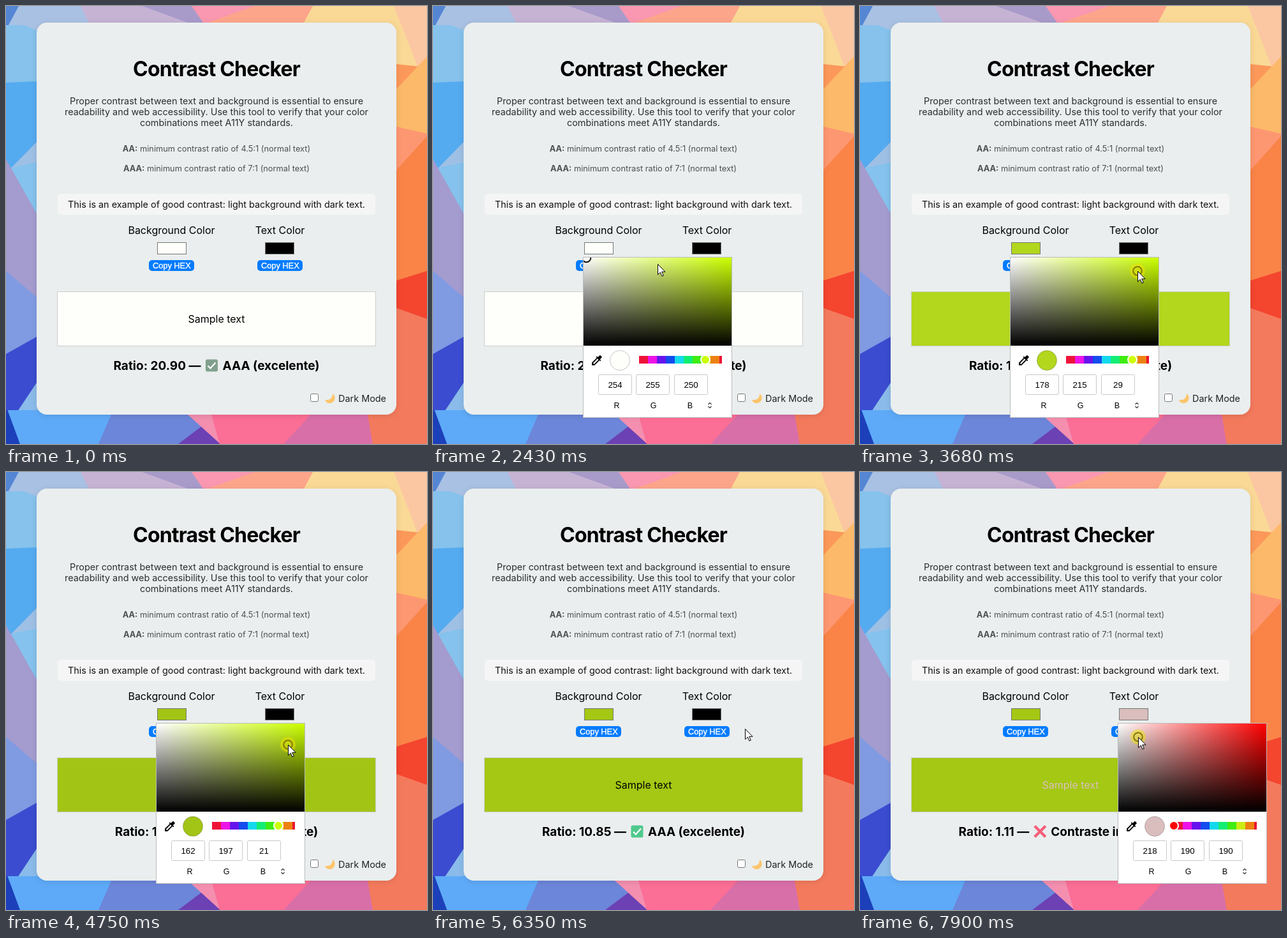
Animation, 660 px wide and 686 px high, one loop 8000 ms. Source, as an HTML page:

```html
<!DOCTYPE html>
<html lang="en">
<head>
<meta charset="utf-8">
<title>Contrast Checker</title>
<style>
html, body { margin: 0; width: 100%; height: 100%; overflow: hidden; }
svg { display: block; width: 660px; height: 686px; font-family: Inter, sans-serif; font-size: 16px; }
.card { fill: #eaeeee; filter: drop-shadow(0 2px 5px rgba(0, 0, 0, .1)); }
.title { font-size: 32px; font-weight: 700; letter-spacing: -.025em; }
.mid { text-anchor: middle; }
.body { font-size: 14.4px; }
.note { font-size: 12.8px; fill: #4c4f50; }
.ui { font-family: "Liberation Sans", Arial, sans-serif; text-anchor: middle; }
.copy { font-size: 12.8px; fill: #fff; stroke: #fff; stroke-width: .4; }
.ratio { font-size: 19px; font-weight: 700; }
</style>
</head>
<body>
<svg viewBox="0 0 660 686">
  <defs>
    <linearGradient id="white"><stop stop-color="#fff"/><stop offset="1" stop-color="#fff" stop-opacity="0"/></linearGradient>
    <linearGradient id="black" x2="0" y2="1"><stop stop-opacity="0"/><stop offset="1"/></linearGradient>
    <clipPath id="area"><rect x="236" y="394" width="232" height="138"/></clipPath>
  </defs>
  <g id="facets"></g>
  <rect class="card" x="48" y="26" width="564" height="614" rx="16"/>

  <text class="mid title" x="330" y="110">Contrast Checker</text>
  <g class="mid body" fill="#2c2e2f">
    <text x="330" y="154">Proper contrast between text and background is essential to ensure</text>
    <text x="330" y="171">readability and web accessibility. Use this tool to verify that your color</text>
    <text x="330" y="188">combinations meet A11Y standards.</text>
  </g>
  <g class="mid note">
    <text x="330" y="228"><tspan font-weight="700">AA:</tspan> minimum contrast ratio of 4.5:1 (normal text)</text>
    <text x="330" y="259"><tspan font-weight="700">AAA:</tspan> minimum contrast ratio of 7:1 (normal text)</text>
  </g>
  <rect x="81" y="294" width="498" height="33" rx="5" fill="#f5f5f5"/>
  <text class="mid body" x="330" y="316" fill="#111">This is an example of good contrast: light background with dark text.</text>

  <text class="mid" x="259.5" y="357">Background Color</text>
  <text class="mid" x="429.5" y="357">Text Color</text>
  <rect id="bgSwatch" x="237.5" y="370.5" width="45" height="18" stroke="#767676"/>
  <rect id="fgSwatch" x="406.5" y="370.5" width="45" height="18" stroke="#767676"/>
  <rect x="224" y="398" width="71" height="17" rx="5" fill="#007bff"/>
  <rect x="394" y="398" width="71" height="17" rx="5" fill="#007bff"/>
  <text class="ui copy" x="259.8" y="411">Copy HEX</text>
  <text class="ui copy" x="429.8" y="411">Copy HEX</text>

  <rect id="sample" x="80.5" y="447.5" width="499" height="85" stroke="#ccc"/>
  <text id="sampleText" class="mid" x="330" y="496">Sample text</text>

  <text id="ratio" class="ratio" y="570"></text>
  <text id="verdict" class="ratio" y="570"></text>
  <g id="check">
    <rect x="-9.5" y="-9.5" width="19" height="19" rx="2.5"/>
    <path d="M-6 .5L-2 4.5L6 -4.5" fill="none" stroke="#fff" stroke-width="2.2"/>
  </g>
  <path id="cross" d="M-8.5 -8.5L8.5 8.5M8.5 -8.5L-8.5 8.5" stroke="#f55f79" stroke-width="4.4"/>

  <rect x="477.5" y="607.5" width="12" height="12" rx="2" fill="#fff" stroke="#767676"/>
  <path d="M512 607C517.5 611 516.5 619 510.5 621.5C505.5 623.5 501 620.5 500 616.5C506 618.5 512.5 615 512 607Z" fill="#fcc56c"/>
  <text class="body" x="596" y="620" text-anchor="end" fill="#222">Dark Mode</text>

  <g id="picker">
    <rect x="235.5" y="393.5" width="233" height="251" fill="#fff" stroke="#bcbcbc"/>
    <g clip-path="url(#area)">
      <rect id="hueFill" x="236" y="394" width="232" height="138"/>
      <rect x="236" y="394" width="232" height="138" fill="url(#white)"/>
      <rect x="236" y="394" width="232" height="138" fill="url(#black)"/>
      <circle id="marker" r="6.8" fill="none" stroke-width="2"/>
    </g>
    <path transform="translate(246.5 544.5) scale(.87)" d="M20.7 5.6l-2.3-2.3a1 1 0 0 0-1.4 0l-3.2 3.1-1.9-1.9-1.4 1.4 1.4 1.4L3 16.2V21h4.8l8.9-8.9 1.4 1.4 1.4-1.4-1.9-1.9 3.1-3.1c.4-.4.4-1 0-1.5zM6.9 19L5 17.1l8-8.1 2 1.9z"/>
    <circle id="chip" cx="293" cy="555" r="15.5" stroke="#000" stroke-opacity=".22"/>
    <g id="strip"></g>
    <circle id="hueDot" cy="554" r="7" stroke="#fff" stroke-width="2"/>
    <g id="fields" class="ui" font-size="13.33"></g>
    <path d="M431.5 624L434 621.5L436.5 624M431.5 627L434 629.5L436.5 627" fill="none" stroke="#333" stroke-width="1.2"/>
  </g>

  <circle id="glow" r="12" fill="#f0e100" fill-opacity=".5"/>
  <path id="cursor" d="M.5 .5V16.8L4.3 13.2L6.9 19.2L9.3 18.1L6.7 12.3H12Z" fill="#fff" stroke="#000"/>
</svg>
<script>
const LOOP = 8000, STEP = 70;
const el = {};
document.querySelectorAll("[id]").forEach(n => el[n.id] = n);

function set(node, attrs) {
  for (const k in attrs) node.setAttribute(k, attrs[k]);
}
function show(node, on) {
  node.style.display = on ? "" : "none";
}
function hsv(h, s, v) {
  return [5, 3, 1].map(n => {
    const k = (n + h / 60) % 6;
    return Math.round(255 * v * (1 - s * Math.max(0, Math.min(k, 4 - k, 1))));
  });
}
const css = c => `rgb(${c.join()})`;

// Each border strip is sliced by slanted cuts: colour, place on the outer edge, place on the card's edge.
// A facet fills everything after its cut; the next one paints over it.
function slice(place, cuts) {
  const deep = 1.15, end = 700;
  el.facets.innerHTML += cuts.map(([color, a, b]) => {
    const pts = [place(a, 0), place(a + (b - a) * deep, deep), place(end, deep), place(end, 0)];
    return `<polygon points="${pts.join(" ")}" fill="${color}"/>`;
  }).join("");
}
slice((p, d) => [48 * d, p], [
  ["#a9c1e3", 0, 0], ["#86c2ec", 19, 38], ["#55abf0", 120, 118], ["#9fc0e5", 262, 213], ["#85c2ed", 255, 245],
  ["#a49bcf", 240, 325], ["#809be2", 415, 456], ["#3b4cd0", 545, 518], ["#8bbbea", 662, 590]
]);
slice((p, d) => [660 - 48 * d, p], [
  ["#fbc7a2", 0, 0], ["#fad996", 133, 10], ["#fb985a", 96, 91], ["#fcb969", 79, 130], ["#fd9771", 200, 189],
  ["#fa8448", 204, 257], ["#f4452f", 415, 430], ["#f47a5d", 490, 473]
]);
slice((p, d) => [p, 26 * d], [
  ["#5486d4", 0, 0], ["#a9c1e3", 20, 6], ["#c6b3d4", 117, 130], ["#a89bca", 213, 285],
  ["#f998b0", 291, 309], ["#fda58b", 390, 316], ["#fad996", 481, 467], ["#fbc7a2", 608, 618]
]);
slice((p, d) => [p, 686 - 46 * d], [
  ["#1c40ba", 0, 0], ["#5eaaf8", 22, 5], ["#6c86d9", 145, 165], ["#6b41b4", 270, 331],
  ["#f48fb0", 336, 285], ["#fb6e95", 335, 322], ["#d96fa8", 435, 478], ["#f47a5d", 575, 567]
]);

// Hue slider in flat bands, from red backwards round the wheel
for (let x = 0, w = 14; x < 130; x += w) {
  const hue = x ? 360 * (1 - (x + w / 2) / 130) : 350;
  el.strip.innerHTML += `<rect x="${323 + x}" y="548" width="${Math.min(w, 130 - x)}" height="12"
    fill="${css(hsv((hue + 360) % 360, 0.92, 0.93))}"/>`;
}

el.fields.innerHTML = ["R", "G", "B"].map((name, i) => {
  const x = 259.5 + Math.round(59.4 * i);
  return `<rect x="${x}" y="577.5" width="52" height="31" rx="2" fill="#fff" stroke="#c8c8c8"/>
    <text class="num" x="${x + 26}" y="598"></text>
    <text x="${288 + 57.5 * i}" y="630" font-size="12.5">${name}</text>`;
}).join("");
const nums = document.querySelectorAll(".num");

// Pointer glides: start, end, goal x, goal y
const glides = [
  [530, 1216, 257, 377], [1880, 2400, 352, 404], [2620, 3600, 435, 415], [3800, 4020, 442, 427],
  [5220, 5480, 443, 425], [5620, 5890, 480, 404], [6210, 6330, 489, 402], [6600, 7060, 417, 376],
  [7160, 7690, 436, 415]
];
function pointer(t) {
  let x = 588, y = 556;
  for (const [from, to, gx, gy] of glides) {
    const rest = 1 - Math.min(1, Math.max(0, (t - from) / (to - from)));
    x = gx + (x - gx) * rest ** 2;
    y = gy + (y - gy) * rest ** 4;
  }
  return [Math.round(x), Math.round(y)];
}

function luminance(c) {
  const lin = c.map(x => (x /= 255) <= 0.03928 ? x / 12.92 : ((x + 0.055) / 1.055) ** 2.4);
  return 0.2126 * lin[0] + 0.7152 * lin[1] + 0.0722 * lin[2];
}
function contrast(a, b) {
  const [hi, lo] = [luminance(a), luminance(b)].sort((x, y) => y - x);
  return (hi + 0.05) / (lo + 0.05);
}
function grade(r) {
  return r >= 7 ? "AAA (excelente)" : r >= 4.5 ? "AA (bueno)" : "Contraste insuficiente";
}

function drawRatio(value, muted) {
  const gap = 34, ok = value >= 4.5;
  el.ratio.textContent = `Ratio: ${value.toFixed(2)} —`;
  el.verdict.textContent = grade(value);
  const a = el.ratio.getComputedTextLength();
  const x = 330 - (a + gap + el.verdict.getComputedTextLength()) / 2;
  el.ratio.setAttribute("x", x);
  el.verdict.setAttribute("x", x + a + gap);
  const at = `translate(${x + a + gap / 2} 563)`;
  set(el.check, { transform: at, fill: muted ? "#80a08d" : "#4fc98c" });
  set(el.cross, { transform: at });
  show(el.check, ok);
  show(el.cross, !ok);
}

function drawPicker(shift, hue, color, spot) {
  const pure = css(hsv(hue, 1, 1));
  el.picker.setAttribute("transform", `translate(${shift} 0)`);
  el.hueFill.setAttribute("fill", pure);
  set(el.hueDot, { cx: 323 + 130 * (hue ? 1 - hue / 360 : 0), fill: pure });
  el.chip.setAttribute("fill", css(color));
  set(el.marker, { cx: spot[0], cy: spot[1], stroke: luminance(color) > 0.18 ? "#111" : "#fff" });
  nums.forEach((n, i) => n.textContent = color[i]);
}

const within = (t, a, b) => t >= a && t < b;

function render(t) {
  const now = t - (t - 530) % STEP;
  const [x, y] = pointer(now);
  const picked = t >= 2630, second = t >= 7150, tinted = t >= 7900;
  const [dx, dy] = pointer(Math.min(now, 5610));
  const bg = picked
    ? hsv(72, 0.8651 + (dx - 435) * 0.00436, 0.8431 - (dy - 415) * 0.00588)
    : hsv(72, 0.0196, 1);
  const fg = tinted ? hsv(0, 0.1284, 0.8549) : [0, 0, 0];

  el.bgSwatch.setAttribute("fill", css(bg));
  el.fgSwatch.setAttribute("fill", css(fg));
  el.sample.setAttribute("fill", css(bg));
  el.sampleText.setAttribute("fill", css(fg));
  drawRatio(contrast(bg, fg), !picked);

  show(el.picker, within(t, 1630, 6020) || second);
  if (second) drawPicker(169, 0, fg, tinted ? [267, 415] : [236, 532]);
  else drawPicker(0, 72, bg, picked ? [dx, dy] : [240.5, 394.5]);

  const at = `translate(${x} ${y})`;
  set(el.cursor, { transform: at });
  set(el.glow, { transform: at });
  show(el.cursor, t >= 530);
  show(el.glow, within(t, 1420, 1630) || within(t, 2560, 5610) || within(t, 5950, 6220) ||
    within(t, 7060, 7150) || t >= 7690);
}

const start = performance.now();
function tick() {
  render((performance.now() - start) % LOOP);
  requestAnimationFrame(tick);
}
tick();
</script>
</body>
</html>
```
